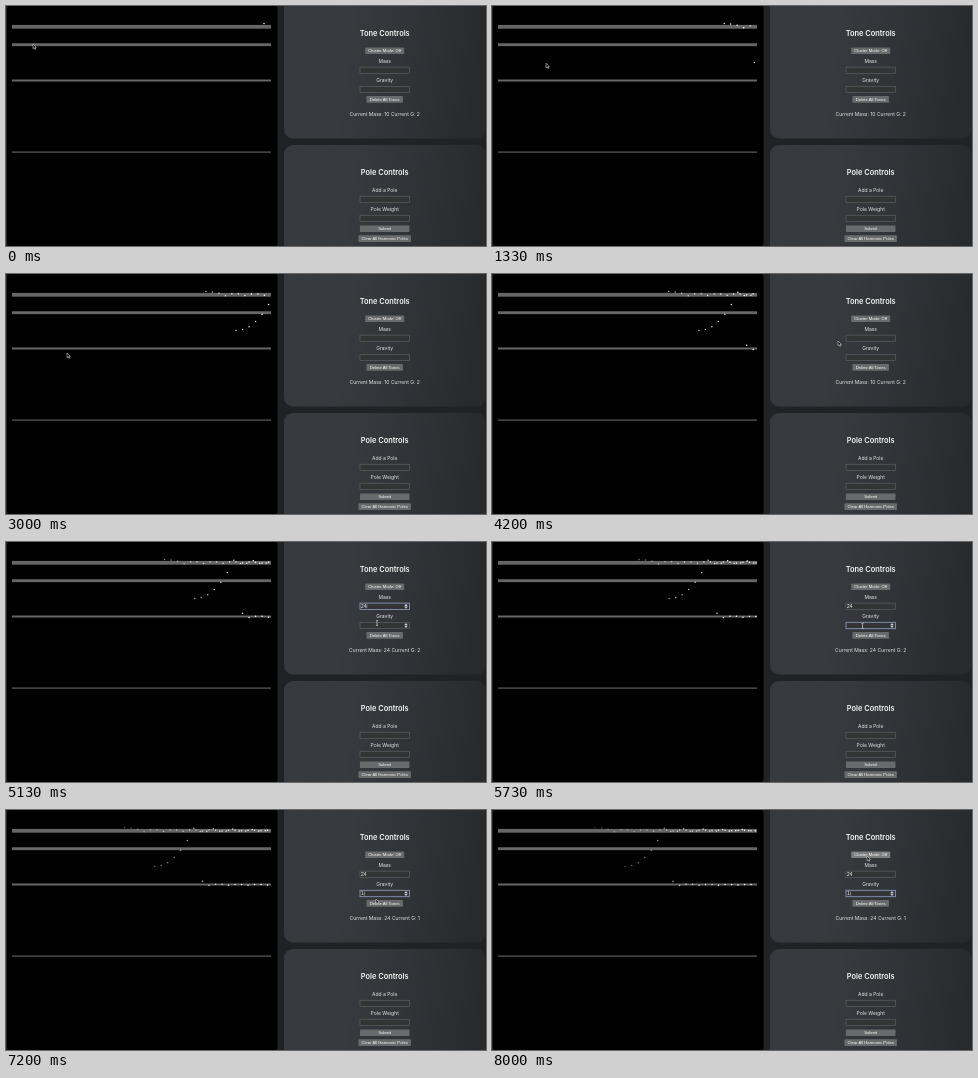
These frames come from a looping animation (480 by 240 pixels, 8070 ms). An HTML page:

```html
<!DOCTYPE html>
<html lang="en">
<head>
<meta charset="utf-8">
<title>Tone and pole controls</title>
<style>
html, body { margin: 0; width: 100%; height: 100%; overflow: hidden; background: #202326; }
svg { display: block; width: 480px; height: 240px; }
text { font: 5px Inter, sans-serif; fill: #e6e7e8; text-anchor: middle; }
.title { font-size: 7.4px; font-weight: 600; fill: #f4f4f4; }
.small { font: 4.2px "Liberation Sans", Arial, sans-serif; fill: #fff; }
.value { font-size: 4.8px; text-anchor: start; }
.button { fill: #696a6b; }
.button.hover { fill: #7d7e7f; }
.input { fill: #333436; stroke: #6d6e70; stroke-width: .5; }
.input.focus { stroke: #8f9fc8; stroke-width: .8; }
</style>
</head>
<body>
<svg viewBox="0 0 480 240">
  <defs>
    <linearGradient id="shade" x1="0" y1="0" x2="1" y2=".1">
      <stop stop-color="#363a3e"/>
      <stop offset=".35" stop-color="#373b3f"/>
      <stop offset="1" stop-color="#282b2e"/>
    </linearGradient>
    <linearGradient id="fade" gradientUnits="userSpaceOnUse" x1="80" x2="250" y1="0" y2="0">
      <stop stop-color="#fff" stop-opacity=".1"/>
      <stop offset="1" stop-color="#fff"/>
    </linearGradient>
  </defs>
  <rect x="1" width="270.5" height="240" rx="2"/>
  <g id="stage"></g>
  <path id="dots" stroke="url(#fade)" stroke-width="1.5" stroke-linecap="round"/>
  <rect x="278" y="-12" width="201.5" height="144.5" rx="9" fill="url(#shade)"/>
  <rect x="278" y="139" width="201.5" height="144.5" rx="9" fill="url(#shade)"/>
  <g id="form"></g>
  <path id="arrow" d="M0 0V4.7L1.1 3.7 1.9 5.4 2.7 5 1.9 3.4H3.3Z" stroke="#e4e4e4" stroke-width=".55"/>
  <path id="beam" d="M-1.1 -2.6Q0 -2.6 0 -2Q0 -2.6 1.1 -2.6M0 -2V2M-1.1 2.6Q0 2.6 0 2Q0 2.6 1.1 2.6" fill="none" stroke="#e4e4e4" stroke-width=".65"/>
</svg>
<script>
const LOOP = 8070, STEP = 200 / 3, SPEED = 0.01937, GAP = 6.5, EDGE = 264.3;
const MID = 378.7;
const $ = id => document.getElementById(id);

function add(parent, tag, attrs, text = '') {
  const node = document.createElementNS('http://www.w3.org/2000/svg', tag);
  for (const key in attrs) node.setAttribute(key, attrs[key]);
  node.textContent = text;
  return $(parent).appendChild(node);
}

// Poles sit an octave apart and get thinner further down.
const pole = n => 2.9 + 17.9 * 2 ** n;
for (let n = 0; n < 4; n++) {
  const height = 3.8 - .9 * n;
  add('stage', 'rect', { x: 6, y: pole(n) - height / 2, width: 259, height, fill: '#666' });
}

const label = (text, y, cls = '') => add('form', 'text', { x: MID, y, class: cls }, text);

function button(text, y, width) {
  const box = add('form', 'rect', { x: MID - width / 2, y, width, height: 6.6, rx: .7, class: 'button' });
  label(text, y + 4.8, 'small');
  return { box, y, width };
}

function input(y) {
  const visibility = 'hidden';
  const box = add('form', 'rect', { x: 354, y, width: 49.4, height: 6.4, class: 'input' });
  const value = add('form', 'text', { x: 355, y: y + 4.9, class: 'small value' });
  const caret = add('form', 'rect', { y: y + 1.1, width: .4, height: 4.2, fill: '#eee', visibility });
  const spinner = add('form', 'path', {
    d: `M398.6 ${y + 2.8}l1.4 -1.8 1.4 1.8zM398.6 ${y + 3.6}l1.4 1.8 1.4 -1.8z`,
    fill: '#d5d7da', stroke: '#d5d7da', 'stroke-width': .3, visibility
  });
  return { box, value, caret, spinner, y };
}

label('Tone Controls', 30.4, 'title');
const cluster = button('Cluster Mode: Off', 41.5, 39);
label('Mass', 56.6);
const mass = input(61.1);
label('Gravity', 75.6);
const gravity = input(80.3);
const clear = button('Delete All Tones', 90.1, 36.5);
const status = label('', 110);
label('Pole Controls', 169.4, 'title');
label('Add a Pole', 185.7);
input(190.2);
label('Pole Weight', 204.8);
input(209.2);
button('Submit', 219.4, 49.5);
button('Clear All Harmonic Poles', 229.3, 52.5);

// A tone accelerates from its start, overshoots its pole and rings out.
const tones = [
  { born: -325, from: 17.6, rest: pole(0) - .4, fall: 3, over: 1.3 },
  { born: 1234, from: 56.5, rest: pole(0) - .4, fall: 6, over: -2.1 },
  { born: 3702, from: 71.2, rest: pole(2) + .2, fall: 1, over: .8 }
];

function toneY({ from, rest, fall, over }, k) {
  if (k < fall) return from + (rest + over - from) * (k / fall) ** 2.1;
  const j = k - fall;
  return rest + over * Math.exp(-.08 * j) * Math.cos(2.1 * j);
}

function dotPath(t) {
  let d = '';
  for (const tone of tones) {
    const first = EDGE + SPEED * (tone.born - t);
    for (let k = 0; first + GAP * k <= EDGE; k++) {
      d += `M${(first + GAP * k).toFixed(2)} ${toneY(tone, k).toFixed(2)}h.01`;
    }
  }
  return d;
}

// Pointer key points: time, x, y
const stops = [
  [0, 27, 38], [1300, 54, 57], [2300, 61, 103], [3000, 61, 79], [3730, 68, 71],
  [4200, 346, 67], [4450, 366, 64], [5100, 371, 81], [6400, 370, 87],
  [7250, 370, 89], [7800, 375, 46], [LOOP, 375, 46]
];

function pointer(t) {
  const i = stops.findIndex(s => s[0] > t);
  const [t0, x0, y0] = stops[i - 1], [t1, x1, y1] = stops[i];
  const p = (t - t0) / (t1 - t0), e = p * p * (3 - 2 * p);
  return [x0 + (x1 - x0) * e, y0 + (y1 - y0) * e];
}

const show = (node, on) => node.setAttribute('visibility', on ? 'visible' : 'hidden');

function updateInput(field, value, focused, hovered, blink) {
  field.box.classList.toggle('focus', focused);
  field.value.textContent = value;
  field.caret.setAttribute('x', 355.4 + value.length * 2.67);
  show(field.caret, focused && blink);
  show(field.spinner, focused || hovered);
}

function draw(t) {
  $('dots').setAttribute('d', dotPath(t));

  const [x, y] = pointer(t);
  const over = f => x > 354 && x < 403.4 && y > f.y && y < f.y + 6.4;
  const typing = over(mass) || over(gravity);
  for (const id of ['arrow', 'beam']) {
    $(id).setAttribute('transform', `translate(${x} ${y})`);
    show($(id), (id === 'beam') === typing);
  }
  for (const b of [cluster, clear]) {
    const hit = Math.abs(x - MID) < b.width / 2 && y > b.y && y < b.y + 6.6;
    b.box.classList.toggle('hover', hit);
  }

  const m = '24'.slice(0, t < 4660 ? 0 : t < 4800 ? 1 : 2);
  const g = t < 7130 ? '' : '1';
  const blink = t % 1000 < 350;
  updateInput(mass, m, t >= 4450 && t < 5400, over(mass), blink);
  updateInput(gravity, g, t >= 5400, over(gravity), blink);
  status.textContent = `Current Mass: ${m || 10} Current G: ${g || 2}`;
}

const start = performance.now();
function tick() {
  const t = (performance.now() - start) % LOOP;
  draw(Math.floor((t + 4) / STEP) * STEP);
  requestAnimationFrame(tick);
}
tick();
</script>
</body>
</html>
```
